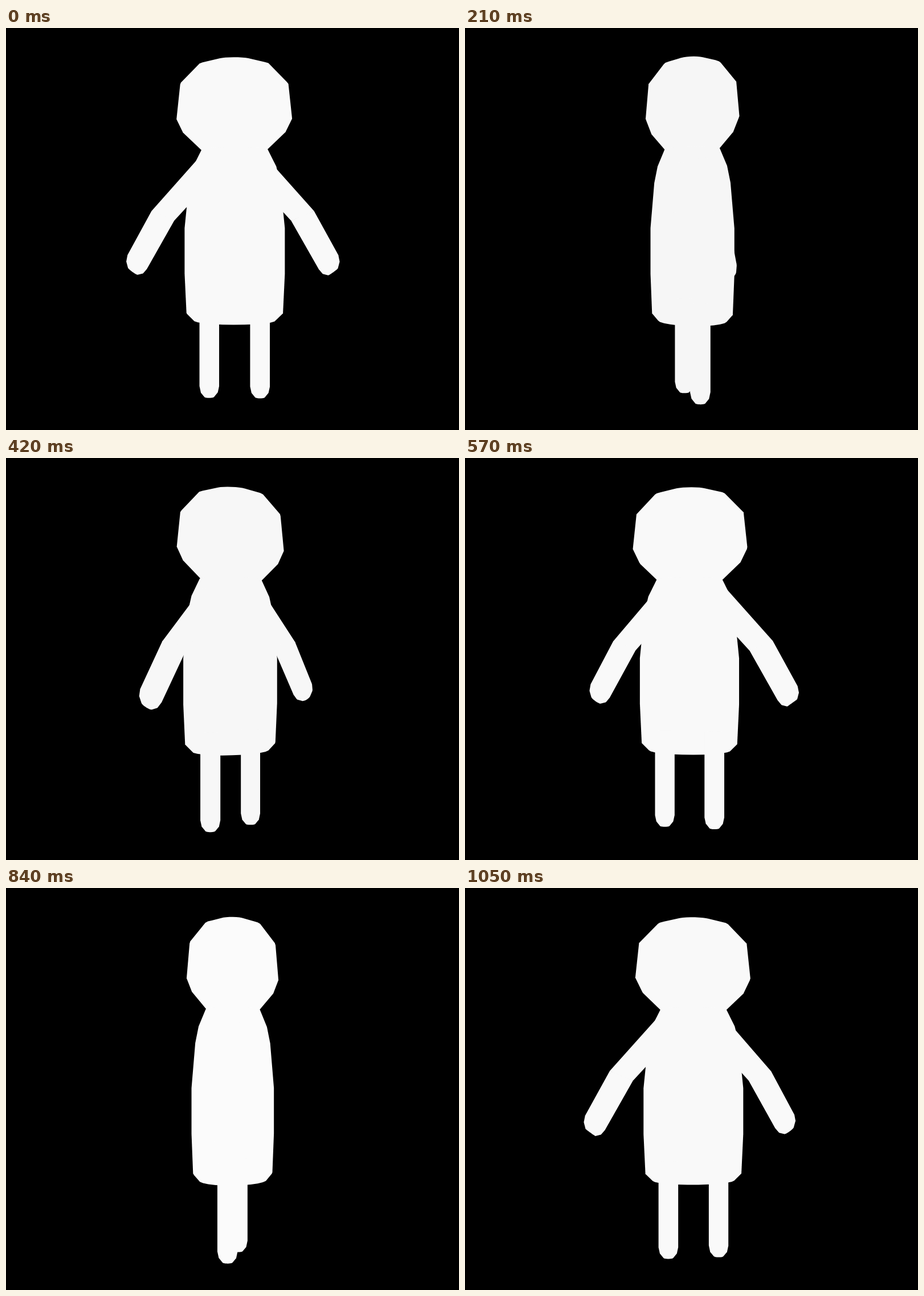
Recreate the animation shown at these times as an HTML page with a canvas. Size 795 px wide and 705 px high, loop 1080 ms.

```html
<!DOCTYPE html>
<html lang="en">
<head>
<meta charset="utf-8">
<title>Turning figure</title>
<style>
  html, body { margin: 0; width: 100%; height: 100%; overflow: hidden; background: #000; }
  canvas { display: block; }
</style>
</head>
<body>
<canvas id="stage" width="795" height="705"></canvas>
<script>
const ctx = document.getElementById('stage').getContext('2d');
const LOOP = 1080, STEP = 30, SIDES = 24;
const AXIS = 397.5, HORIZON = 333, DEPTH = 1370;
const rad = deg => deg * Math.PI / 180;

// Ellipse around (x, y): (ux, uy) is one half axis, the other points into depth.
function ring(x, y, ux, uy, flat) {
  const rz = flat * Math.hypot(ux, uy);
  return Array.from({ length: SIDES }, (_, i) => {
    const a = 2 * Math.PI * i / SIDES, c = Math.cos(a);
    return [x + ux * c, y + uy * c, rz * Math.sin(a)];
  });
}

// A solid from a profile of [y, radius] key points.
const solid = (x, flat, profile) => profile.flatMap(([y, r]) => ring(x, y, r, 0, flat));

// A limb's cross-section between two edge points.
const section = ([x1, y1], [x2, y2], flat) =>
  ring((x1 + x2) / 2, (y1 + y2) / 2, (x1 - x2) / 2, (y1 - y2) / 2, flat);

// A cross-section closed by a rounded end that reaches along (dx, dy).
const tip = (x, y, ux, uy, dx, dy, flat) => [0, 30, 60].flatMap(deg => {
  const c = Math.cos(rad(deg)), s = Math.sin(rad(deg));
  return ring(x + dx * s, y + dy * s, ux * c, uy * c, flat);
});

function leg(side) {
  const x = 3.7 + 44.5 * side, r = 17.3;
  return [...ring(x, 480, r, 0, 1), ...tip(x, 628.5, r, 0, 0, 21.5, 1)];
}

function arm(side) {
  const flat = 0.87;
  const shoulder = section([side * 62.5, 231], [side * 45.5, 276], flat);
  const elbow = section([side * 142.7, 321], [side * 102.7, 338], flat);
  const hand = tip(side * 168, 410.5, side * 17, -12.5, side * 9, 19, flat);
  return [[...shoulder, ...elbow], [...elbow, ...hand]];
}

const head = solid(2.9, 0.785,
  [[55, 29], [64, 62], [98.5, 95], [159.5, 101.5], [183, 90], [213, 58.5]]);
const torso = solid(3.7, 0.815,
  [[213, 58], [243, 73], [272, 80], [351, 88], [431, 88], [500, 84.7], [512.5, 72]]);

// The head leans: it rises by a fixed share of its nearness.
const parts = [
  { points: head, lean: 0.165 },
  ...[torso, leg(-1), leg(1), ...arm(-1), ...arm(1)].map(points => ({ points }))
];

function project({ points, lean }, deg) {
  const turn = rad(deg + 2), c = Math.cos(turn), s = Math.sin(turn);
  return points.map(([x, y, z]) => {
    const near = x * s + z * c;
    const scale = DEPTH / (DEPTH - near);
    return [
      AXIS + (x * c - z * s) * scale,
      lean ? y - lean * near : HORIZON + (y - HORIZON) * scale
    ];
  });
}

function hull(points) {
  const sorted = points.sort((a, b) => a[0] - b[0] || a[1] - b[1]);
  const chain = list => {
    const out = [];
    for (const p of list) {
      while (out.length > 1) {
        const [a, b] = out.slice(-2);
        if ((b[0] - a[0]) * (p[1] - a[1]) - (b[1] - a[1]) * (p[0] - a[0]) > 0) break;
        out.pop();
      }
      out.push(p);
    }
    return out.slice(0, -1);
  };
  return [...chain(sorted), ...chain([...sorted].reverse())];
}

function draw(deg) {
  ctx.fillStyle = '#000';
  ctx.fillRect(0, 0, 795, 705);
  const tone = Math.round(248.5 - 3 * Math.sin(rad(deg)));
  ctx.fillStyle = `rgb(${tone},${tone},${tone})`;
  for (const part of parts) {
    ctx.beginPath();
    for (const [x, y] of hull(project(part, deg))) ctx.lineTo(x, y);
    ctx.closePath();
    ctx.fill();
  }
}

const start = performance.now();
function tick() {
  const t = Math.max(0, performance.now() - start) % LOOP;
  draw(Math.floor(t / STEP) * 360 * STEP / LOOP);
  requestAnimationFrame(tick);
}
tick();
</script>
</body>
</html>
```
